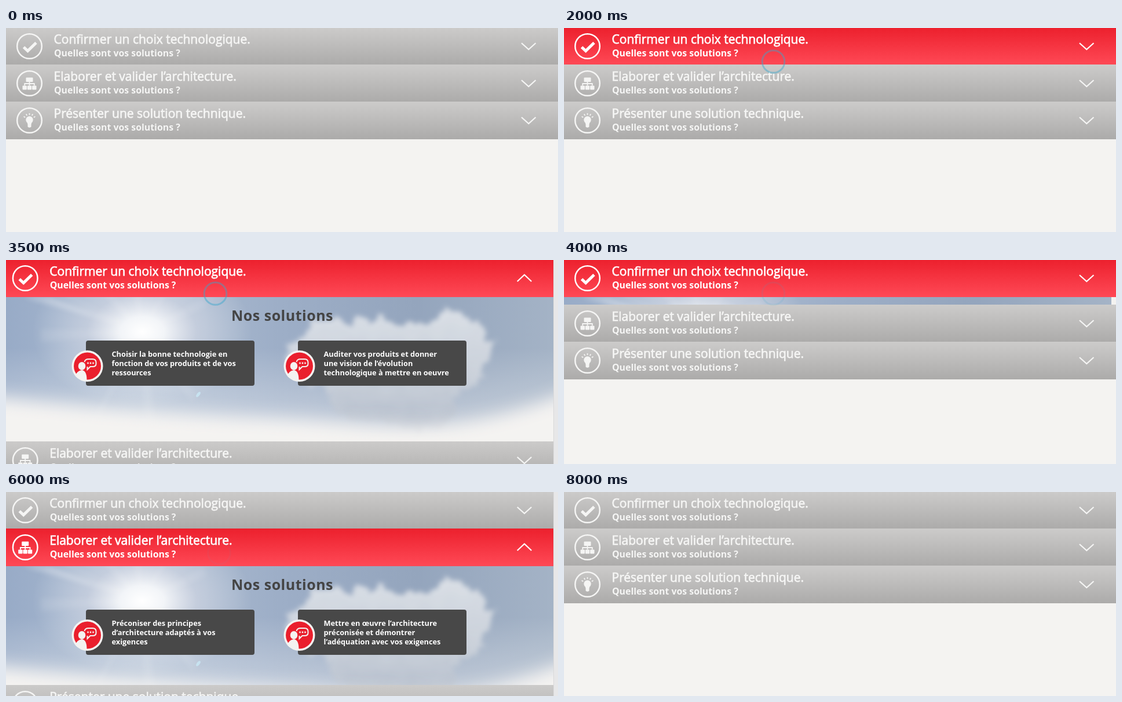
Recreate the animation shown at these times as an HTML page. Size 953 px wide and 352 px high, loop 9000 ms.

```html
<!DOCTYPE html>
<html lang="fr">
<head>
<meta charset="utf-8">
<title>Nos solutions</title>
<style>
  html, body { margin: 0; width: 100%; height: 100%; overflow: hidden; background: #f4f3f1; }
  svg { display: block; }
  text { font-family: "Open Sans", "Noto Sans", sans-serif; }
  .title { font-size: 21px; stroke-width: .75px; }
  .sub { font-size: 15.85px; font-weight: 700; }
  .head { font-size: 25px; font-weight: 700; letter-spacing: .5px; fill: #444; }
  .item { font-size: 12.75px; font-weight: 700; fill: #fff; }
</style>
</head>
<body>
<svg id="stage" width="953" height="352" viewBox="0 0 953 352"></svg>
<script>
const LOOP = 9000, STEP = 250, SLIDE = 260, FULL = 250, ROW = 64;

const rows = [
  { title: "Confirmer un choix technologique.", icon: "check", open: 2312, close: 3780,
    items: [["Choisir la bonne technologie en", "fonction de vos produits et de vos", "ressources"],
            ["Auditer vos produits et donner", "une vision de l’évolution", "technologique à mettre en oeuvre"]] },
  { title: "Elaborer et valider l’architecture.", icon: "chart", open: 5812, close: 6755,
    items: [["Préconiser des principes", "d’architecture adaptés à vos", "exigences"],
            ["Mettre en œuvre l’architecture", "préconisée et démontrer", "l’adéquation avec vos exigences"]] },
  { title: "Présenter une solution technique.", icon: "bulb" }
];

// Pointer rings: position, first shown, start of fade, end of fade
const rings = [
  { x: 361.5, y: 58, from: 2000, fade: 2000, end: 2750 },
  { x: 361.5, y: 58, from: 3500, fade: 3750, end: 4250 },
  { x: 368, y: 105, from: 5500, fade: 5500, end: 6250 },
  { x: 368, y: 105, from: 6750, fade: 6750, end: 7500 }
];

// Pointer disc: shown between two times, gliding from one point to the next
const glides = [
  { from: 500, to: 2000, start: 500, time: 1000, a: [361.5, 79], b: [361.5, 58] },
  { from: 4750, to: 5500, start: 4500, time: 500, a: [361.5, 58], b: [368, 87] }
];

const clamp = v => Math.max(0, Math.min(1, v));
const swing = p => (1 - Math.cos(Math.PI * clamp(p))) / 2;

const rect = (x, y, w, h, more = "") => `<rect x="${x}" y="${y}" width="${w}" height="${h}" ${more}/>`;
const oval = (x, y, rx, ry = rx, more = "") => `<ellipse cx="${x}" cy="${y}" rx="${rx}" ry="${ry}" ${more}/>`;
const stops = colors => colors.map((c, i) => `<stop offset="${i / (colors.length - 1)}" stop-color="${c}"/>`).join("");
const grad = (id, box, ...colors) => `<linearGradient id="${id}" ${box}>${stops(colors)}</linearGradient>`;
const DOWN = 'x2="0" y2="1"', ACROSS = 'x2="1" y2="0"';

// Icons are centred on 0,0
const rays = [-150, -120, -90, -60, -30].map(a => {
  const c = Math.cos(a * Math.PI / 180), s = Math.sin(a * Math.PI / 180);
  return `M${8.5 * c} ${8.5 * s - 1}L${11.5 * c} ${11.5 * s - 1}`;
}).join("");
const icons = {
  check: `<path d="M-10 1.5L-3 8L11.5 -6" fill="none" stroke="currentColor" stroke-width="5"/>`,
  chart: rect(-6, -10, 12, 7.5, 'rx="1"') + [-12, -3.7, 4.6].map(x => rect(x, 4, 7.4, 7, 'rx="1"')).join("") +
    `<path d="M0 -3V4M-8.3 4V.5H8.3V4" fill="none" stroke="currentColor" stroke-width="1.8"/>`,
  bulb: oval(0, -1, 6.2) + `<path d="M-4 3H4L3 7V11Q0 13.5 -3 11V7Z"/>` +
    `<path d="${rays}" stroke="currentColor" stroke-width="1.8"/>`
};

function header(row, i) {
  return `<g id="row${i}">
    ${rect(0, -1, 953, 65, `id="bar${i}"`)}
    <g id="ink${i}" fill="currentColor">
      <g transform="translate(40.5 31.5)">
        ${oval(0, 0, 21.3, 21.3, 'fill="none" stroke="currentColor" stroke-width="2.5"')}${icons[row.icon]}
      </g>
      <text class="title" stroke="currentColor" x="82.5" y="27">${row.title}</text>
      <text class="sub" x="83" y="49">Quelles sont vos solutions ?</text>
      <path id="arrow${i}" fill="none" stroke="currentColor" stroke-width="2.3"/>
    </g>
  </g>`;
}

function card(x, lines) {
  return rect(x, 75, 291, 78, 'rx="4" fill="#484848"') +
    `<use href="#badge" x="${x + 2.5}" y="119"/>` +
    lines.map((s, k) => `<text class="item" x="${x + 44.5}" y="${103 + 16 * k}">${s}</text>`).join("");
}

function panel(row, i) {
  return `<svg id="panel${i}" width="945" height="0" overflow="hidden">
    <use href="#sky"/>
    <text class="head" x="477" y="41" text-anchor="middle">Nos solutions</text>
    ${card(138, row.items[0])}${card(504, row.items[1])}
  </svg>`;
}

const puffs = [[515, 100, 34, 26], [562, 72, 48, 38], [635, 78, 62, 42], [705, 88, 72, 42], [768, 62, 40, 40],
  [806, 92, 32, 46], [590, 125, 80, 38], [705, 140, 110, 42], [640, 180, 80, 36], [715, 195, 65, 34]];

// Beams of light around the sun, each a thin wedge
const beams = [20, 52, 85, 118, 150, 178, 205, 228, 262, 300, 335].map((a, k) =>
  `<path transform="rotate(${a})" d="M0 -3L${110 + k * 37 % 120} ${-5 - k % 3 * 3}V${5 + k % 3 * 3}L0 3Z"/>`).join("");

const defs = `<defs>
  ${grad("grey", DOWN, "#cccbca", "#acabaa")}
  ${grad("red", DOWN, "#ec202d", "#ff4956")}
  ${grad("air", ACROSS, "#98abc7", "#adbdd2", "#9daec7", "#94a5bd", "#a4b3c6")}
  ${grad("puff", 'gradientUnits="userSpaceOnUse" x1="0" y1="20" x2="0" y2="230"', "#e6e9ed", "#d3d8df", "#b3bcca")}
  <linearGradient id="haze" ${DOWN}>
    <stop offset=".35" stop-color="#eef0f3" stop-opacity="0"/><stop offset="1" stop-color="#eef0f3" stop-opacity=".6"/>
  </linearGradient>
  <radialGradient id="glow">
    <stop offset="0" stop-color="#fff"/><stop offset=".2" stop-color="#fff" stop-opacity=".85"/>
    <stop offset=".5" stop-color="#f4f1f5" stop-opacity=".38"/><stop offset="1" stop-color="#fff" stop-opacity="0"/>
  </radialGradient>
  <filter id="soft" x="-20%" y="-60%" width="140%" height="220%"><feGaussianBlur stdDeviation="15"/></filter>
  <filter id="hazy" x="-20%" y="-20%" width="140%" height="140%"><feGaussianBlur stdDeviation="5"/></filter>
  <filter id="fluff" x="-10%" y="-10%" width="120%" height="120%">
    <feTurbulence type="fractalNoise" baseFrequency=".045" numOctaves="4" seed="5" result="n"/>
    <feDisplacementMap in="SourceGraphic" in2="n" scale="34" xChannelSelector="R" yChannelSelector="G"/>
    <feGaussianBlur stdDeviation="4"/>
  </filter>
  <g id="sky">
    ${rect(0, 0, 945, 250, 'fill="url(#air)"')}
    ${rect(0, 0, 945, 250, 'fill="url(#haze)"')}
    ${oval(235, 60, 190, 130, 'fill="url(#glow)"')}
    <g transform="translate(235 60)" fill="#fff" opacity=".1" filter="url(#hazy)">${beams}</g>
    <path d="M30 0L225 55L75 0Z" fill="#fff" opacity=".3" filter="url(#hazy)"/>
    <g fill="url(#puff)" opacity=".85" filter="url(#fluff)">${puffs.map(p => oval(...p)).join("")}</g>
    <path d="M-60 168C100 184 220 200 440 208S760 258 1010 148V320H-60Z" fill="#f4f3f1" filter="url(#soft)"/>
    ${oval(332, 168, 2.5, 5.5, 'fill="#c9e9f5" opacity=".8" transform="rotate(38 332 168)"')}
  </g>
  <g id="badge">
    ${oval(0, 0, 27, 27, 'fill="#f4f3f1"')}${oval(0, 0, 23.5, 23.5, 'fill="#ea1f2d"')}
    <g fill="#f4f3f1">
      ${oval(-9.5, 0, 6.3, 7)}
      <path d="M-21 17Q-18 8 -9.5 7Q-1 8 -1 24Q-14 25 -21 17Z"/>
      ${[1, 5.5, 10].map(x => oval(x, -5, 1.4)).join("")}
    </g>
    <path d="M-5 -7Q-4 -12 2 -12H9Q15 -12 15 -6V-4Q15 1 9 1H5L0 6V1" fill="none" stroke="#f4f3f1" stroke-width="2"/>
  </g>
</defs>`;

const stage = document.getElementById("stage");
stage.innerHTML = defs + rect(0, 0, 953, 352, 'fill="#f4f3f1"') +
  rows.map((r, i) => (r.items ? panel(r, i) : "") + header(r, i)).join("") +
  `<g id="scroll">${rect(945, 0, 8, 352, 'fill="#e7e7e8"')}${rect(945, 0, 1, 352, 'fill="#d9d9da"')}</g>` +
  oval(0, 0, 19.3, 19.3, 'id="ring" fill="none" stroke="#38a6cc" stroke-width="3"') +
  oval(0, 0, 15.8, 15.8, 'id="disc" fill="#2f9fd0" opacity=".7"');

const $ = id => document.getElementById(id);
const set = (id, attrs) => { for (const k in attrs) $(id).setAttribute(k, attrs[k]); };
const show = (id, on) => { $(id).style.display = on ? "" : "none"; };

function heightAt(row, t) {
  if (!row.items) return 0;
  return Math.round(FULL * (swing((t - row.open) / SLIDE) - swing((t - row.close) / SLIDE)));
}

function drawPointer(t) {
  const ring = rings.find(r => t >= r.from && t < r.end);
  show("ring", ring);
  if (ring) {
    const left = 1 - clamp((t - ring.fade) / (ring.end - ring.fade));
    set("ring", { cx: ring.x, cy: ring.y, opacity: .45 * left * left });
  }
  const glide = glides.find(g => t >= g.from && t < g.to);
  show("disc", glide);
  if (glide) {
    const p = swing((t - glide.start) / glide.time);
    const [cx, cy] = glide.a.map((v, k) => v + (glide.b[k] - v) * p);
    set("disc", { cx, cy });
  }
}

function draw(t) {
  const hot = t < 500 ? -1 : t < 4750 ? 0 : t < 8000 ? 1 : -1;
  const heights = rows.map(r => heightAt(r, t));
  const tall = heights.reduce((a, b) => a + b, 192) > 352;
  const shift = tall ? -7.3 : 0;
  let y = 0;
  rows.forEach((row, i) => {
    const h = heights[i], up = row.items && t >= row.open && t < row.close;
    set("row" + i, { transform: `translate(0 ${y})` });
    set("bar" + i, { fill: i === hot ? "url(#red)" : "url(#grey)" });
    set("ink" + i, { transform: `translate(${shift} 0)`, color: i === hot ? "#fff" : "#f5f5f4" });
    set("arrow" + i, { d: up ? "M890 37L902.3 25.5L914.5 37" : "M890 26L902.3 37L914.5 26" });
    if (row.items) {
      show("panel" + i, h > 0);
      set("panel" + i, { y: y + ROW, height: h });
    }
    y += ROW + h;
  });
  show("scroll", tall);
  drawPointer(t);
}

let last = -1;
function tick(now) {
  const t = Math.floor(now % LOOP / STEP) * STEP;
  if (t !== last) draw(last = t);
  requestAnimationFrame(tick);
}
draw(0);
requestAnimationFrame(tick);
</script>
</body>
</html>
```
